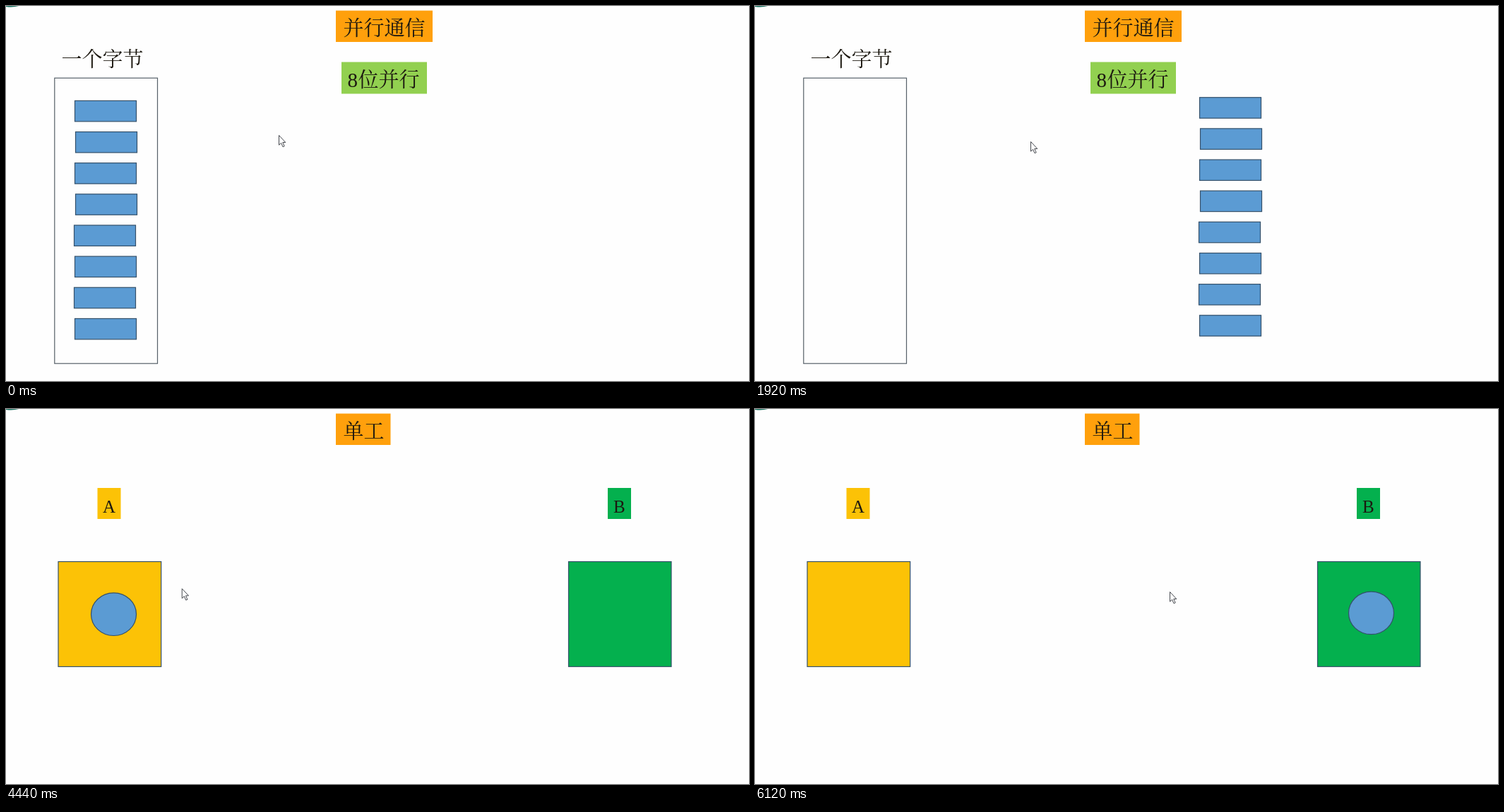
An HTML page for the animation above (6180 ms loop, 1052 by 532 pixels).

```html
<!DOCTYPE html>
<html lang="zh-CN">
<head>
<meta charset="utf-8">
<title>并行通信与单工</title>
<style>
  html, body { margin: 0; width: 100%; height: 100%; overflow: hidden; background: #fefefe; }
  svg { display: block; width: 1052px; height: 532px; }
  text { font: 300 29px "Noto Serif CJK SC", "Noto Sans CJK SC", "Noto Sans CJK", serif; fill: #1c1810; }
  .digit { font: 29px "Liberation Serif", serif; }
  .letter { font: 25px "Liberation Serif", serif; text-anchor: middle; }
  .line { stroke: #34506a; stroke-width: 1.2; }
  .blue { fill: #5b9bd3; }
  .orange { fill: #ffa00c; }
  .yellow { fill: #fcc206; }
  .green { fill: #04b04e; }
</style>
</head>
<body>
<svg viewBox="0 0 1052 532">
  <circle cx="7" cy="-41.5" r="43" fill="#17705f"/>

  <g id="parallel">
    <rect class="orange" x="467" y="6.5" width="137" height="44.5"/>
    <text x="477.5" y="41.5">并行通信</text>
    <rect x="475" y="79.5" width="121" height="45" fill="#92d050"/>
    <text class="digit" x="483.5" y="114.5">8</text>
    <text x="498.5" y="114.5">位并行</text>
    <text x="78.5" y="86">一个字节</text>
    <rect x="68.8" y="102.2" width="145.7" height="405" fill="none" stroke="#566068" stroke-width="1.2"/>
    <g id="bits"></g>
  </g>

  <g id="simplex">
    <rect class="orange" x="467" y="6.5" width="77.5" height="44.5"/>
    <text x="477.5" y="41.5">单工</text>
    <rect class="yellow" x="129.5" y="112" width="33" height="44"/>
    <text class="letter" x="146" y="146.5">A</text>
    <rect class="green" x="852" y="112" width="33" height="44"/>
    <text class="letter" x="868.3" y="146.5">B</text>
    <rect class="yellow line" x="74" y="216.5" width="145.7" height="149"/>
    <rect class="green line" x="796.5" y="216.5" width="145.5" height="149"/>
    <ellipse id="ball" class="blue line" rx="32" ry="30.3"/>
  </g>

  <path id="cursor" d="M.5 .5V14.2L3.6 11.3L6 16.8L8.2 15.9L5.8 10.5H9.8Z"
        fill="#fff" stroke="#45484e" stroke-linejoin="round"/>
</svg>
<script>
const LOOP = 6180, STEP = 60, CUT = 2820, MOVE = 870;
const el = id => document.getElementById(id);
const mix = (a, b, f) => a + (b - a) * f;
const place = (node, x, y) => node.setAttribute('transform', `translate(${x.toFixed(2)} ${y.toFixed(2)})`);

// eight bits: odd rows sit 1px right, the lower half 1px left
for (let i = 0; i < 8; i++) {
  const bit = document.createElementNS('http://www.w3.org/2000/svg', 'rect');
  const box = { x: 97.5 + i % 2 - (i > 3), y: 134.4 + i * 44.15, width: 87, height: 29.4, class: 'blue line' };
  for (const key in box) bit.setAttribute(key, box[key]);
  el('bits').append(bit);
}

// sine ease from 0 to 1
function glide(t, start, time = MOVE) {
  const u = Math.min(1, Math.max(0, (t - start) / time));
  return (1 - Math.cos(Math.PI * u)) / 2;
}

// pointer hops: start, duration, x, y
const hops = [
  [1380, 240, 390, 192],
  [1980, 240, 267, 192],
  [CUT, 360, 393, 211],
  [3960, 780, 180, 275],
  [5220, 300, 605, 258],
  [5940, 180, 587, 259]
];

const pointer = t => hops.reduce(([x, y], [start, time, toX, toY]) => {
  const f = glide(t, start, time);
  return [mix(x, toX, f), mix(y, toY, f)];
}, [386, 183]);

function draw() {
  const t = Math.floor(performance.now() % LOOP / STEP) * STEP;
  const first = t < CUT;
  el('parallel').style.display = first ? '' : 'none';
  el('simplex').style.display = first ? 'none' : '';
  const slide = glide(t, 1402), roll = glide(t, 4567);
  place(el('bits'), 821.5 * slide, -7.2 * slide);
  place(el('ball'), mix(152.5, 872.5, roll), mix(291.2, 289.4, roll));
  place(el('cursor'), ...pointer(t));
  requestAnimationFrame(draw);
}
draw();
</script>
</body>
</html>
```
